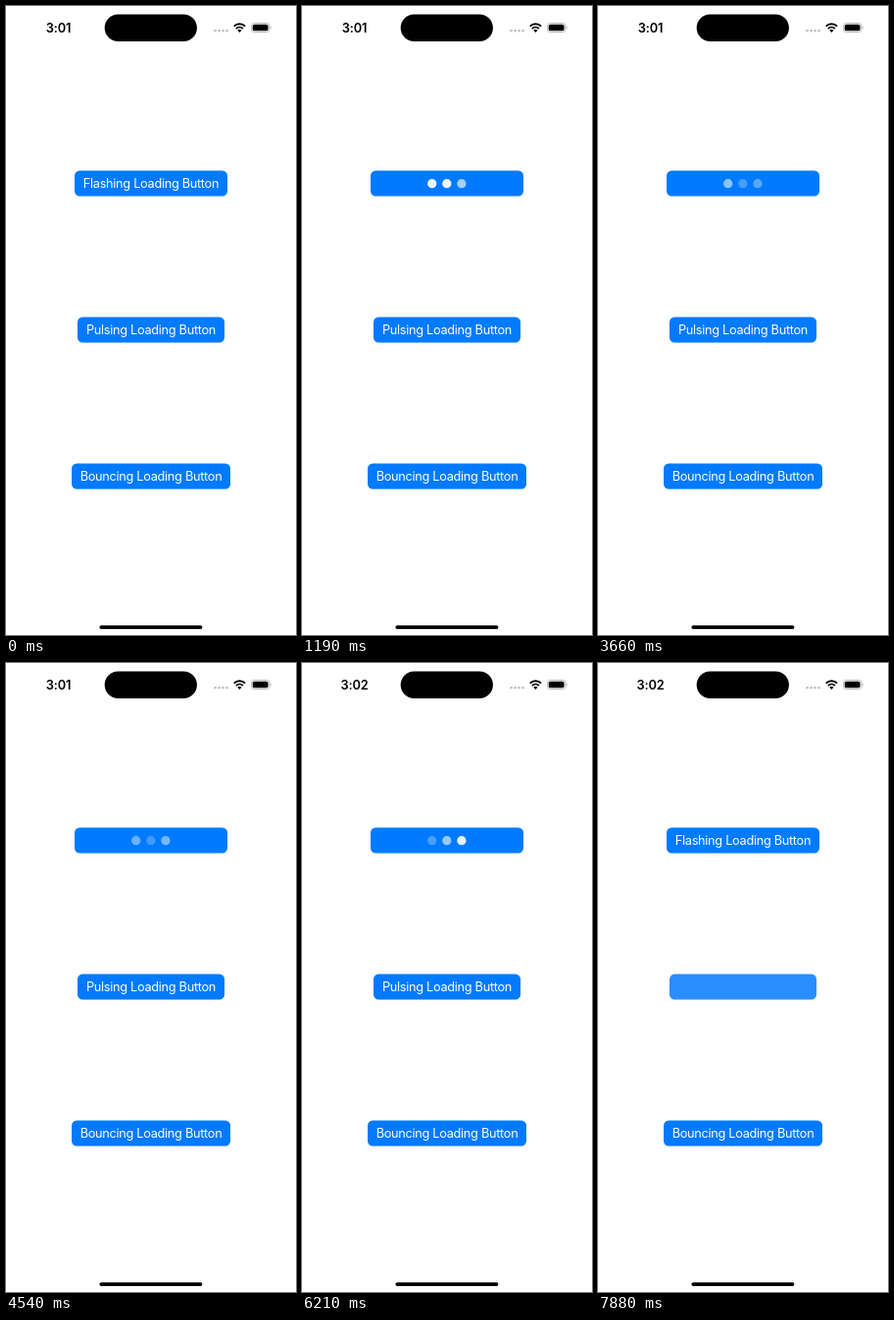
Recreate the animation shown at these times as an HTML page. Size 296x640 px, loop 8000 ms.

```html
<!DOCTYPE html>
<html lang="en">
<head>
<meta charset="utf-8">
<title>Loading buttons</title>
<style>
  html, body { margin: 0; width: 100%; height: 100%; overflow: hidden; background: #fff; }
  svg { display: block; width: 296px; height: 640px; }
  text { font-family: Inter, Roboto, sans-serif; text-anchor: middle; }
  .label { font-size: 12.75px; letter-spacing: -0.3px; fill: #fff; }
  .clock { font-size: 12.8px; font-weight: 600; letter-spacing: -0.1px; }
</style>
</head>
<body>
<svg viewBox="0 0 296 640">
  <rect width="296" height="640" fill="#fff"/>
  <text id="clock" class="clock" x="53.5" y="26.6">3:01</text>
  <rect x="100.7" y="8.5" width="94.2" height="27.6" rx="13.8"/>
  <g id="signal" fill="#c4c4c6"></g>
  <g fill="none" stroke="#000" stroke-width="1.9">
    <path d="M232.7 20.6a8.2 8.2 0 0 1 11.4 0"/>
    <path d="M234.9 23a5.1 5.1 0 0 1 7 0"/>
  </g>
  <path d="M238.4 26.9l-2.1-2.2a3.1 3.1 0 0 1 4.2 0z"/>
  <rect x="250.4" y="17.4" width="18.4" height="9.2" rx="3" fill="none" stroke="#a6a6a6" stroke-width=".8"/>
  <rect x="251.7" y="18.7" width="15.8" height="6.6" rx="1.9"/>
  <path d="M269.7 20.5a1.7 1.7 0 0 1 0 3z" fill="#a6a6a6"/>
  <g id="buttons"></g>
  <rect x="95.4" y="630.2" width="105" height="3.8" rx="1.9"/>
</svg>
<script>
const LOOP = 8000;
const TAP_FLASH = 500, FLASH_END = 6560, SETTLED = 6790, TAP_PULSE = 7770;
const MINUTE = 5650;
const CYCLE = 940, FIRST_DOT = 635, DOT_LAG = CYCLE / 6;

const byId = id => document.getElementById(id);
const clamp = v => Math.min(1, Math.max(0, v));
const ease = v => v * v * (3 - 2 * v);

function add(parent, tag, attrs, text = '') {
  const node = document.createElementNS('http://www.w3.org/2000/svg', tag);
  for (const key in attrs) node.setAttribute(key, attrs[key]);
  node.textContent = text;
  return parent.appendChild(node);
}

function makeButton(text, width, y) {
  const group = add(byId('buttons'), 'g', {});
  add(group, 'rect', { x: 148 - width / 2, y, width, height: 26.1, rx: 5.2, fill: '#007aff' });
  const label = add(group, 'text', { class: 'label', x: 148, y: y + 17.7 }, text);
  return { group, label };
}

const flashing = makeButton('Flashing Loading Button', 156, 167.4);
const pulsing = makeButton('Pulsing Loading Button', 150, 316.4);
makeButton('Bouncing Loading Button', 162, 465.4);

const dots = [0, 1, 2].map(i =>
  add(flashing.group, 'circle', { cx: 132.7 + 15.1 * i, cy: 180.7, r: 4.65, fill: '#fff' }));
for (let i = 0; i < 4; i++) add(byId('signal'), 'circle', { cx: 213.6 + 4 * i, cy: 25.2, r: 1.35 });

const pressDim = since => since < 0 ? 1 : 0.75 + 0.25 * clamp(since / 330);
const labelFade = since => since < 0 ? 1 : clamp(0.6 - since / 170);

function dotOpacity(t, i) {
  const phase = Math.max(0, t - FIRST_DOT - i * DOT_LAG) / CYCLE % 1;
  return 0.25 + 0.75 * ease(1 - Math.abs(2 * phase - 1));
}

function render(t) {
  const loading = t >= TAP_FLASH && t < FLASH_END;
  const settling = t >= FLASH_END && t < SETTLED;

  byId('clock').textContent = t < MINUTE ? '3:01' : '3:02';
  flashing.group.setAttribute('opacity', pressDim(t - TAP_FLASH));
  flashing.label.setAttribute('opacity', loading ? labelFade(t - TAP_FLASH) : settling ? 0.9 : 1);
  dots.forEach((dot, i) => dot.setAttribute('opacity',
    loading ? dotOpacity(t, i) * clamp((t - TAP_FLASH - 50) / 160) : 0));
  pulsing.group.setAttribute('opacity', pressDim(t - TAP_PULSE));
  pulsing.label.setAttribute('opacity', labelFade(t - TAP_PULSE));
}

const origin = performance.now();
function tick() {
  render((performance.now() - origin) % LOOP);
  requestAnimationFrame(tick);
}
tick();
</script>
</body>
</html>
```
